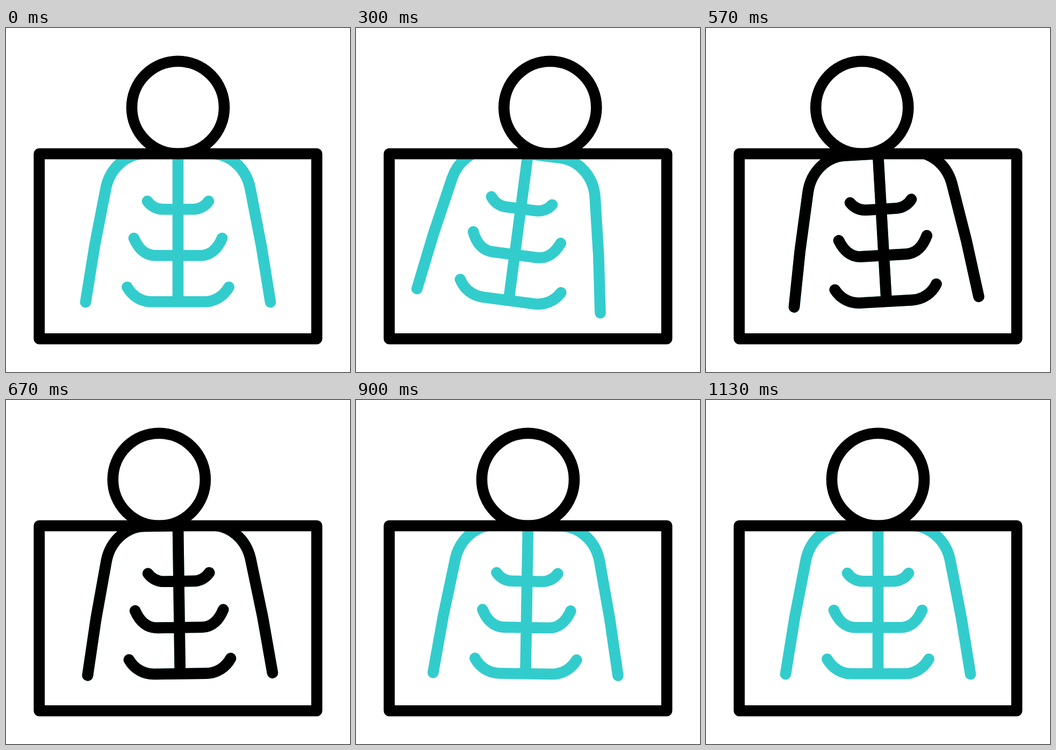
An HTML page with a canvas that plays this animation: 640 by 640 pixels, repeating every 1.67 s.

```html
<!DOCTYPE html>
<html lang="en">
<head>
<meta charset="utf-8">
<title>X-ray</title>
<style>
html, body { margin: 0; width: 100%; height: 100%; overflow: hidden; background: #fff; }
canvas { display: block; width: 640px; height: 640px; }
</style>
</head>
<body>
<canvas id="stage" width="640" height="640"></canvas>
<script>
const ctx = document.getElementById('stage').getContext('2d');
const LOOP = 1670;
const STEP = 1000 / 30;
const CYAN = '#33cccc';
const BLACK = '#000';

// [step, value] pairs, eased in and out between neighbours
const headShift = [[2, 0], [9, 41.3], [19, -38], [25, 0]];
const bodyAngle = [[2, 0], [8, 8], [16, -3.5], [24, 1.9], [30, 0]];
const darkFrom = 11, darkTo = 25;

const arm = 'M320 234H258C224 234 194 260 186 297L165 405L148 510';
const armRight = 'M320 234H382C416 234 446 260 454 297L475 405L492 510';
const ribs =
  'M263 322C269 331 280 337.3 292 337.3H348C360 337.3 371 331 377 322' +
  'M238 391C246 410 259 423.3 278 423.3H362C381 423.3 394 410 402 391' +
  'M225.5 482C235 499 252 509.3 272 509.3H368C388 509.3 405 499 414.5 482';
const body = new Path2D(arm + armRight + ribs + 'M320 234V509');

function valueAt(keys, n) {
  if (n <= keys[0][0]) return keys[0][1];
  for (let i = 1; i < keys.length; i++) {
    const [a, from] = keys[i - 1];
    const [b, to] = keys[i];
    if (n <= b) {
      const p = (n - a) / (b - a);
      return from + (to - from) * p * p * (3 - 2 * p);
    }
  }
  return keys[keys.length - 1][1];
}

function drawBody(n) {
  ctx.save();
  // the film hides everything above its top edge
  ctx.beginPath();
  ctx.rect(0, 234, 640, 406);
  ctx.clip();
  ctx.translate(320, 234);
  ctx.rotate(valueAt(bodyAngle, n) * Math.PI / 180);
  ctx.translate(-320, -234);
  ctx.strokeStyle = CYAN;
  ctx.stroke(body);
  if (n >= darkFrom && n < darkTo) {
    ctx.strokeStyle = BLACK;
    ctx.stroke(body);
  }
  ctx.restore();
}

function draw(n) {
  ctx.fillStyle = '#fff';
  ctx.fillRect(0, 0, 640, 640);
  ctx.lineWidth = 20.6;
  ctx.lineCap = ctx.lineJoin = 'round';
  drawBody(n);
  ctx.strokeStyle = BLACK;
  ctx.beginPath();
  ctx.arc(320 + valueAt(headShift, n), 147.9, 86, 0, Math.PI * 2);
  ctx.stroke();
  ctx.strokeRect(61.8, 234, 516.4, 344.2);
}

const start = performance.now();
function tick() {
  const t = (performance.now() - start) % LOOP;
  draw(Math.floor((t + 4) / STEP));
  requestAnimationFrame(tick);
}
tick();
</script>
</body>
</html>
```
